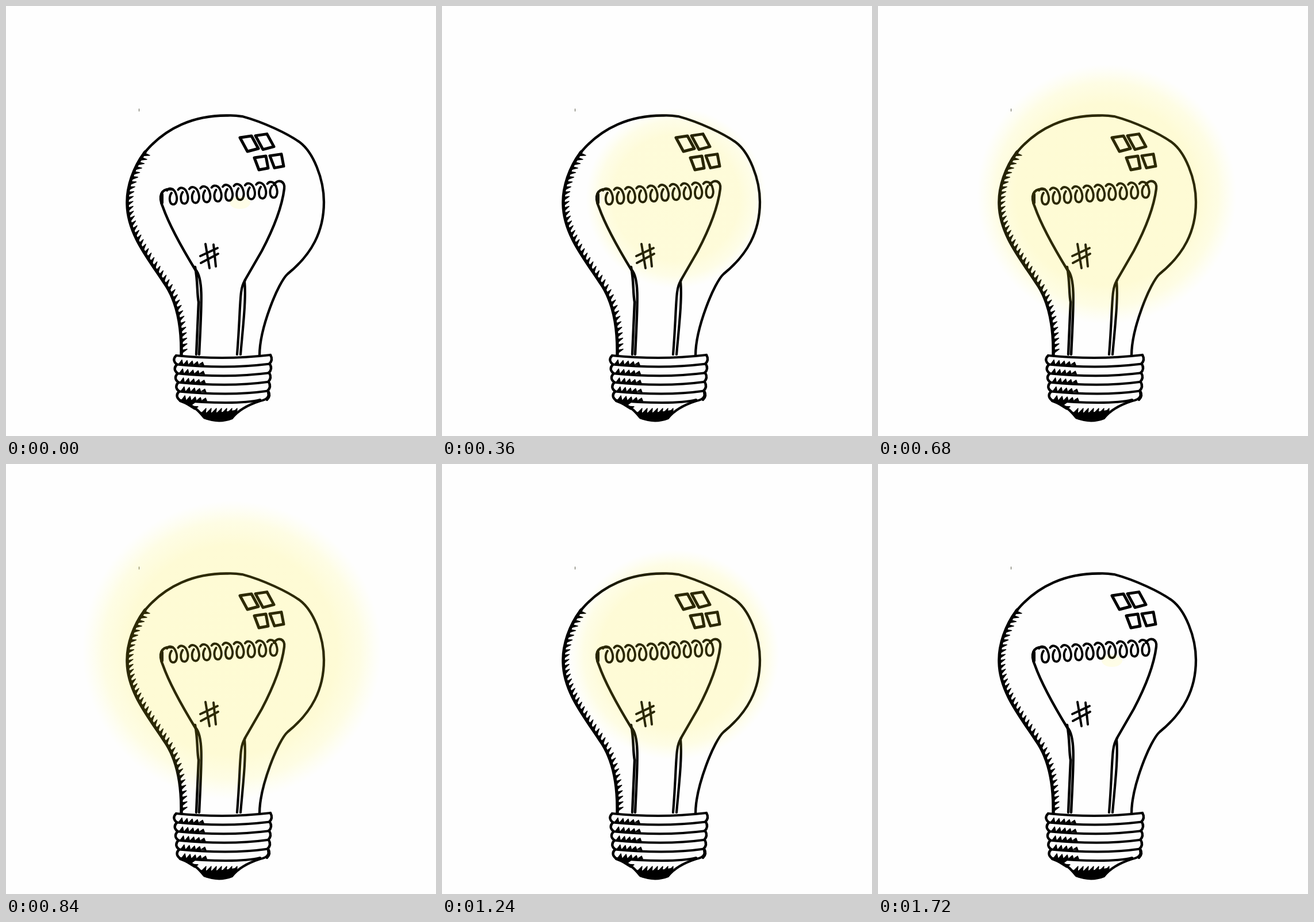
These frames come from a looping animation (748x748 px, 1760 ms). An HTML page:

```html
<!DOCTYPE html>
<html lang="en">
<head>
<meta charset="utf-8">
<title>Light bulb</title>
<style>
  html, body { margin: 0; width: 100%; height: 100%; overflow: hidden; background: #fefefe; }
  svg { display: block; width: 100%; height: 100%; }
  #ink { stroke: #000; fill: none; stroke-linecap: round; stroke-linejoin: round; }
</style>
</head>
<body>
<svg viewBox="0 0 748 748">
  <defs>
    <radialGradient id="light">
      <stop offset="0" stop-color="#ffef0c" stop-opacity=".175"/>
      <stop offset=".7" stop-color="#ffec14" stop-opacity=".175"/>
      <stop offset=".86" stop-color="#fff428" stop-opacity=".12"/>
      <stop offset="1" stop-color="#ffff50" stop-opacity="0"/>
    </radialGradient>
  </defs>
  <g id="ink"></g>
  <ellipse id="ember" cx="407" cy="342" rx="18" ry="11" fill="#fff040" opacity=".12"/>
  <circle id="glow" fill="url(#light)"/>
</svg>
<script>
const $ = id => document.getElementById(id);

function draw(d, width = 4, fill = 'none') {
  const path = document.createElementNS('http://www.w3.org/2000/svg', 'path');
  path.setAttribute('d', d);
  path.setAttribute('stroke-width', width);
  path.setAttribute('fill', fill);
  $('ink').append(path);
  return path;
}
const blot = d => draw(d, 1.4, '#000');

function drawGlass() {
  draw('M242 254C278 211 328 190 385 190.5Q398 190 411 192C448 202 490 222 511 237' +
    'C534 254 553 300 553 341C553 392 532 432 490 466C474 480 441 560 441 608', 4.3);
  const shade = draw('M242 254C222 280 210 315 211 345C212 398 250 442 275 481C295 509 306 550 305 606', 5.5);
  const length = shade.getTotalLength(), pitch = 9.3;
  for (let s = 2; s < length - 5; s += pitch) {
    const a = shade.getPointAtLength(s), b = shade.getPointAtLength(s + 6);
    const ux = (b.x - a.x) / 6, uy = (b.y - a.y) / 6;
    blot(`M${a.x} ${a.y}L${a.x + 10 * uy - 2 * ux} ${a.y - 10 * ux - 2 * uy}L${b.x} ${b.y}Z`);
  }
}

function drawFilament() {
  draw('M290 319C268 316 265 332 273 350C285 384 308 424 330 460', 4.4);
  draw('M271 328V342', 6);
  draw('M329 454C334 480 332 500 335 515L331 606M330 459C344 475 340 520 336 606', 4.4);
  draw('M466 311C473 300 486 304 484 318C480 350 465 388 445 426L415 478', 4.4);
  draw('M416 477C405 492 409 520 402 606M415 479C418 510 412 560 408 606', 4.2);

  // Each turn arches to the right and hooks back under itself
  for (let i = 0; i < 10; i++) {
    draw(`M${280 + 19.4 * i} ${321 - 1.3 * i}c4 -6 13 -4 16 7c3 9 0 18 -6 17c-6 -1 -7 -13 -2 -20`, 3.9);
  }
}

function drawMarks() {
  for (const x of [0, 27]) {
    draw(`M${407 + x} ${229 - x / 8}l20 -3l12 22l-19 5Z`, 5);
    draw(`M${432 + x} ${264 - x / 8}l20 -3l4 21l-16 3Z`, 5);
  }
  draw('M347 414L354 456M361 415L365 453M338 435L368 421M339 447L369 431', 4);
  draw('M231.5 179v4', 1).setAttribute('stroke', '#554');
}

function drawBase() {
  const rows = 5, gap = 15.6;
  for (let i = 0; i <= rows; i++) {
    const y = 608 + gap * i, last = i === rows;
    const left = 296 + i * 1.3, right = last ? 442 : 460 - i;
    draw(`M${left} ${y}q40 4 80 4T${right} ${y - 1}`, 4);
    if (last) break;
    draw(`M${left} ${y}q-8 8 1.3 ${gap}M${460 - i} ${y - 1}q5 9 -2 ${gap}`, 4.4);
    for (let j = 0; j < 5; j++) {
      const x = left + 4 + 9 * j;
      blot(`M${x} ${y + gap}l6 ${j - 8}l2 ${9 - j}Z`);
    }
  }
  draw('M456 673Q459 684 442 687', 4);
  draw('M303 687C330 697 334 703 345 716Q370 726 393 717Q408 698 442 687', 4.4);
  blot('M338 707Q368 710 402 703L391 718Q368 724 346 718Z');
  for (let x = 339; x < 395; x += 9) blot(`M${x} 709l9 -9l-1 9Z`);
  blot('M304 687L328 690L320 696L334 697L328 702Z');
}

drawGlass();
drawFilament();
drawMarks();
drawBase();

const STEP = 40, STEPS = 44, RISE = 21;
const glow = $('glow');

function frame(now) {
  const step = Math.floor(now / STEP) % STEPS;
  const power = Math.min(step, STEPS - 1 - step) / RISE;
  glow.setAttribute('cx', 418 - 25 * power);
  glow.setAttribute('cy', 342 - 18 * power);
  glow.setAttribute('r', 80 + 180 * power);
  glow.setAttribute('opacity', 1 - (1 - power) ** 4);
  $('ember').style.display = power ? 'none' : '';
  requestAnimationFrame(frame);
}
frame(0);
</script>
</body>
</html>
```
